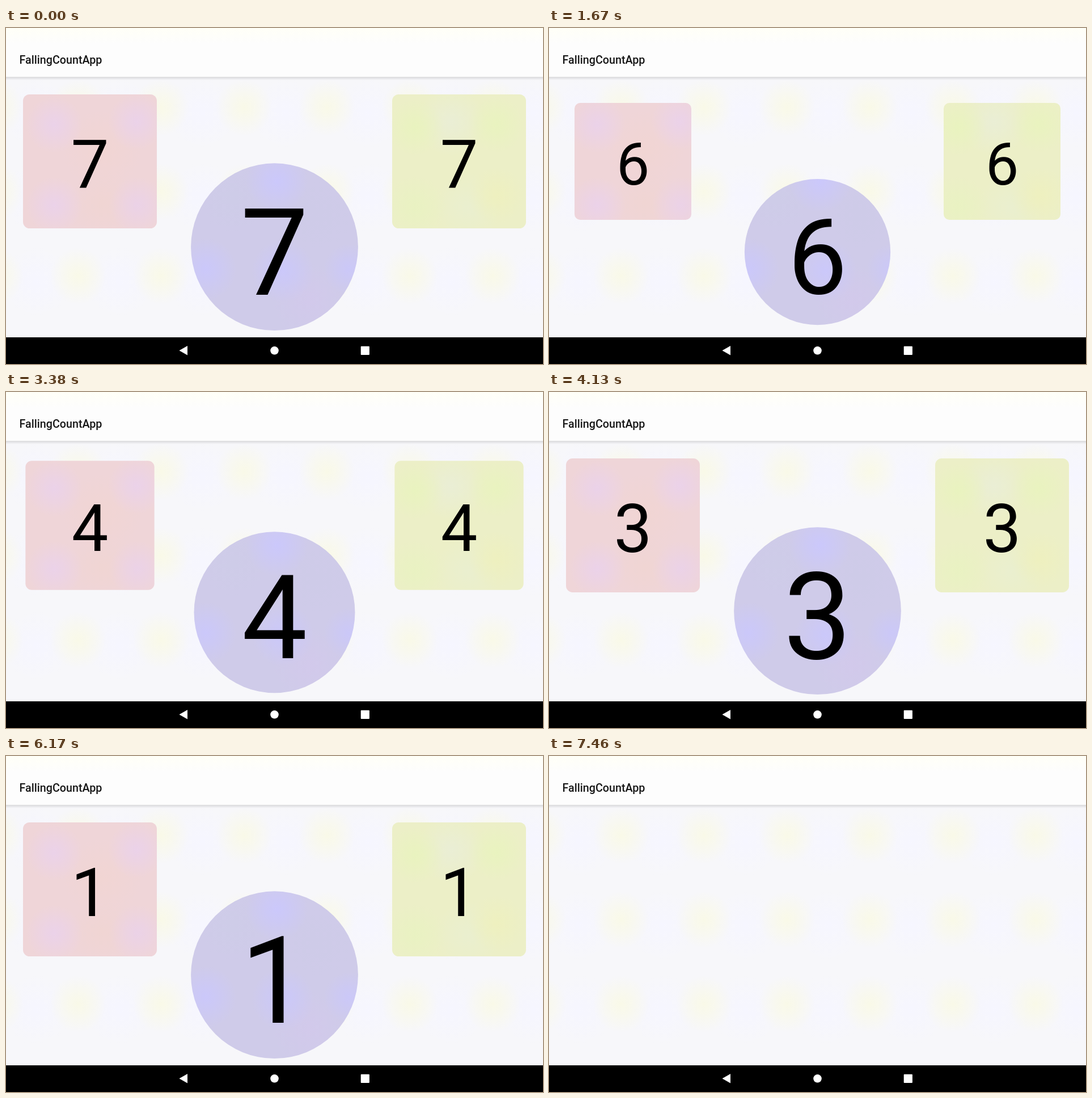
An HTML page with a canvas that plays this animation: 947 px wide and 592 px high, repeating every 7920 ms.

```html
<!DOCTYPE html>
<html lang="en">
<head>
<meta charset="utf-8">
<title>Countdown</title>
<style>
  html, body { margin: 0; width: 100%; height: 100%; overflow: hidden; background: #000; }
  canvas { display: block; }
</style>
</head>
<body>
<canvas id="stage" width="947" height="592"></canvas>
<script>
const W = 947, H = 592, LOOP = 7920;
const TICK = 1028;       // time between two pulses
const LEAD = 60;         // the digit changes just before its pulse starts
const SHRINK = 950;      // length of one pulse
const FADE_START = 7160, FADE_END = 7460;
const FIRST = 7;

const canvas = document.getElementById('stage');
const ctx = canvas.getContext('2d');
const clamp = v => Math.max(0, Math.min(1, v));

function glow(c, x, y, r, color) {
  const g = c.createRadialGradient(x, y, 0, x, y, r);
  g.addColorStop(0, color);
  g.addColorStop(0.35, color + 'b0');
  g.addColorStop(1, color + '00');
  c.fillStyle = g;
  c.fillRect(x - r, y - r, 2 * r, 2 * r);
}

// A sheet holds a colour with soft spots fixed to the screen.
function sheet(color, spots) {
  const s = document.createElement('canvas');
  s.width = W;
  s.height = H;
  const c = s.getContext('2d');
  c.fillStyle = color;
  c.fillRect(0, 0, W, H);
  spots.forEach(([x, y, r, tint]) => glow(c, x, y, r, tint));
  return s;
}

function makeBackdrop() {
  const spots = [];
  for (let row = 0; row < 3; row++) {
    for (let col = 0; col < 7; col++) {
      const x = -19 + col * 146.2, y = 140 + row * 148.5;
      spots.push([x + 73, y + 10, 62, '#f6f6ff'], [x, y, 50, '#f9f9e8']);
    }
  }
  const s = sheet('#f7f7fa', spots);
  const c = s.getContext('2d');

  c.fillStyle = '#fdfdfd';
  c.fillRect(0, 0, W, 87);
  const top = c.createLinearGradient(0, 0, 0, 28);
  top.addColorStop(0, '#fffff7');
  top.addColorStop(1, '#fdfdfd');
  c.fillStyle = top;
  c.fillRect(0, 0, W, 28);
  const shadow = c.createLinearGradient(0, 86, 0, 92);
  shadow.addColorStop(0, 'rgba(0,0,0,.13)');
  shadow.addColorStop(1, 'rgba(0,0,0,0)');
  c.fillStyle = shadow;
  c.fillRect(0, 86, W, 6);

  c.fillStyle = '#171717';
  c.font = '500 19.7px Roboto, sans-serif';
  c.fillText('FallingCountApp', 23.6, 63.3);

  c.fillStyle = '#000';
  c.fillRect(0, 545, W, 47);
  c.fillStyle = '#fff';
  c.beginPath();
  c.moveTo(305.5, 568.3);
  c.lineTo(320, 560);
  c.lineTo(320, 576.6);
  c.closePath();
  c.fill();
  c.beginPath();
  c.arc(473.5, 568.3, 7.3, 0, 2 * Math.PI);
  c.fill();
  c.beginPath();
  c.roundRect(625.7, 560.8, 15.2, 15.2, 1);
  c.fill();
  return s;
}

const backdrop = makeBackdrop();

const pink = sheet('#efd5d8', [
  [170, 215, 70, '#f1d5d3'], [170, 310, 60, '#f0d5d3'],
  [85, 170, 50, '#ebd2e9'], [230, 165, 50, '#ebd2e9'],
  [85, 312, 50, '#ebd2e9'], [232, 312, 50, '#ebd2e7']
]);
const lime = sheet('#ecefc7', [
  [785, 165, 60, '#eaeed5'], [815, 315, 60, '#eaefcf'],
  [722, 175, 50, '#e9f3bf'], [865, 170, 50, '#e9f3bf'],
  [722, 315, 55, '#e9f2c2'], [865, 295, 50, '#eef0bf']
]);
const violet = sheet('#cfcbe9', [
  [400, 300, 60, '#cecce8'], [550, 330, 60, '#cecbe8'],
  [535, 480, 65, '#d2c9eb'], [478, 270, 55, '#cbc8fb'],
  [352, 425, 55, '#cbc8fa'], [488, 428, 55, '#cbc8fa'],
  [605, 425, 45, '#cbc8f8']
]);

// Geometry is given at the largest pulse size; py is the fixed height when scaling.
const square = x => () => ctx.roundRect(x - 118, 117, 236, 236, 11.5);
const disc = () => ctx.arc(473.5, 385.7, 147.4, 0, 2 * Math.PI);
const timers = [
  { x: 148, py: 235, size: 119.5, baseline: 282, paint: pink, outline: square(148) },
  { x: 799, py: 235, size: 119.5, baseline: 282, paint: lime, outline: square(799) },
  { x: 473.5, py: 456, size: 213.6, baseline: 469.8, paint: violet, outline: disc }
];

function drawTimer(timer, digit, scale) {
  const { x, py, size, baseline, paint, outline } = timer;
  ctx.save();
  ctx.translate(x, py);
  ctx.scale(scale, scale);
  ctx.translate(-x, -py);
  ctx.beginPath();
  outline();
  ctx.save();
  ctx.setTransform(1, 0, 0, 1, 0, 0);
  ctx.fillStyle = ctx.createPattern(paint, 'no-repeat');
  ctx.fill();
  ctx.restore();
  ctx.fillStyle = '#000';
  ctx.font = `400 ${size}px Roboto, sans-serif`;
  ctx.textAlign = 'center';
  ctx.fillText(digit, x, baseline);
  ctx.restore();
}

function draw(t) {
  ctx.globalAlpha = 1;
  ctx.drawImage(backdrop, 0, 0);
  if (t >= FADE_END) return;

  const step = time => Math.min(FIRST - 1, Math.floor(time / TICK));
  const digit = FIRST - step(t + LEAD);
  const progress = clamp((t - step(t) * TICK) / SHRINK);
  const eased = (1 - Math.cos(Math.PI * progress)) / 2;
  const scale = (1.2 - 0.2 * eased) / 1.2;

  ctx.globalAlpha = 1 - clamp((t - FADE_START) / (FADE_END - FADE_START));
  timers.forEach(timer => drawTimer(timer, String(digit), scale));
}

let start = null;
function frame(now) {
  if (start === null) start = now;
  draw((now - start) % LOOP);
  requestAnimationFrame(frame);
}
draw(0);
requestAnimationFrame(frame);
</script>
</body>
</html>
```
